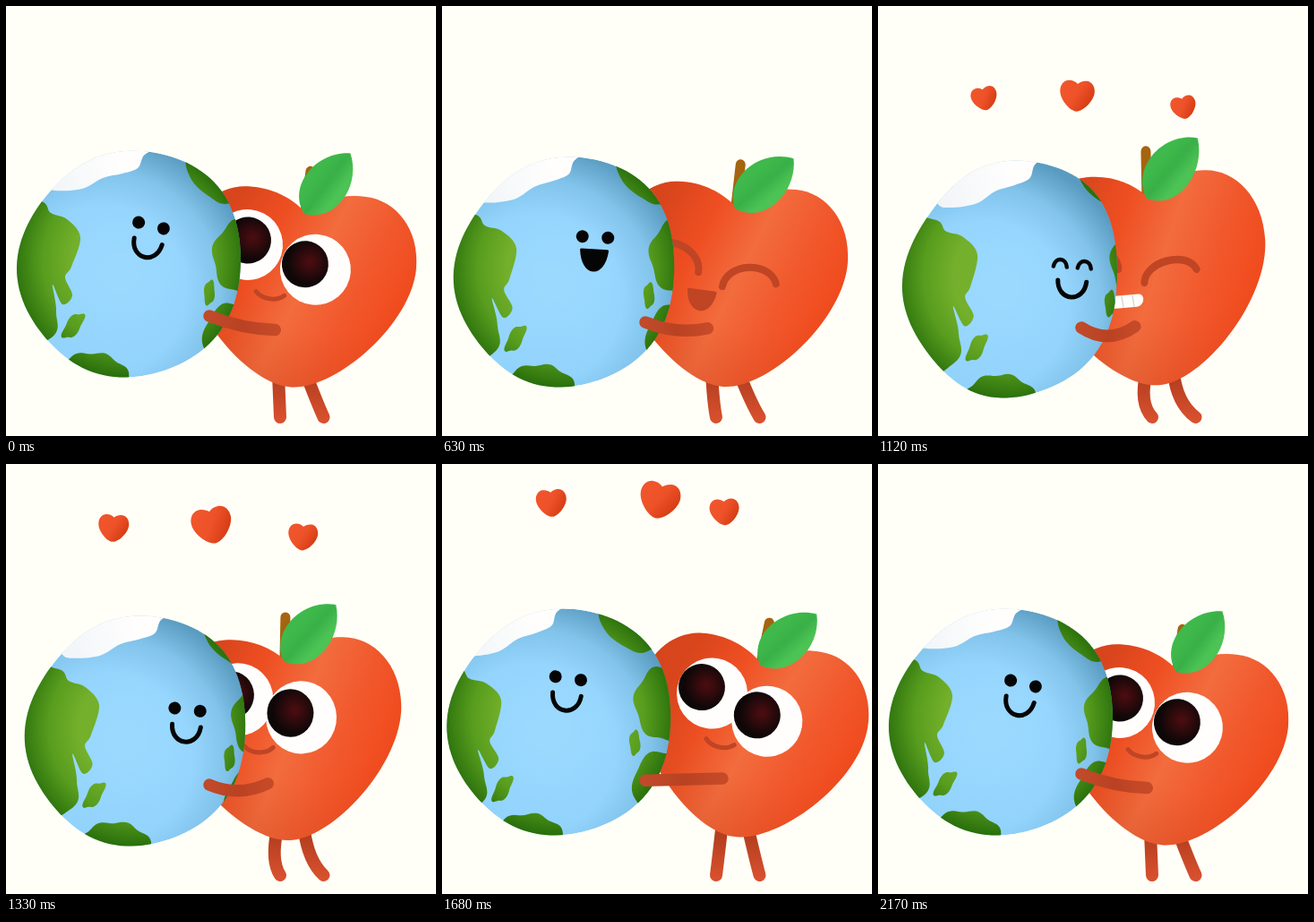
An HTML page with a canvas for the animation above (2.31 s loop, 480 by 480 pixels).

```html
<!DOCTYPE html>
<html lang="en">
<head>
<meta charset="utf-8">
<title>Earth hug</title>
<style>
html, body { margin: 0; width: 100%; height: 100%; overflow: hidden; background: #fffff7; }
canvas { display: block; width: 480px; height: 480px; }
</style>
</head>
<body>
<canvas id="stage" width="480" height="480"></canvas>
<script>
const ctx = document.getElementById('stage').getContext('2d');
const LOOP = 2310, STEP = 70;
const BROWN = '#bf4525', INK = '#050505';

// gx, gy: globe centre; turn, roll: its spin; fx, fy, nod: its face;
// ax, ay: dip of the heart; tilt, leaf: angles; gap: between the eyes; hand: height
const POSES = [
  { gx: 137, gy: 288, squeeze: 0, turn: 0, roll: 0, fx: 25, fy: -43, nod: .24, ax: 334, ay: 230, tilt: .088, leaf: -.92, gap: 78, hand: 346 },
  { gx: 130, gy: 288, squeeze: 0, turn: -8, roll: -.1, fx: 10, fy: -49, nod: .13, ax: 357, ay: 222, tilt: .163, leaf: -.72, gap: 65, hand: 354 },
  { gx: 136, gy: 297, squeeze: .35, turn: 3, roll: -.07, fx: 35, fy: -39, nod: .06, ax: 328, ay: 224, tilt: .07, leaf: -.69, gap: 72, hand: 353 },
  { gx: 147, gy: 305, squeeze: 1, turn: 20, roll: -.07, fx: 70, fy: -16, nod: .07, ax: 300, ay: 212, tilt: -.061, leaf: -.82, gap: 72, hand: 359 },
  { gx: 140, gy: 292, squeeze: 0, turn: 8, roll: 0, fx: 44, fy: -33, nod: .14, ax: 325, ay: 222, tilt: .026, leaf: -.81, gap: 68, hand: 357 }
];
// Time of each key and the pose reached there; fractions blend neighbours.
const KEY_T = [0, 350, 490, 560, 630, 1120, 1470, 1645, 1890, 2170];
const KEY_P = [0, 1, 1, 1.2, 2, 3, 4, 1, .2, 0];

// Monotone cubic through the given values.
function curve(ts, vs, t) {
  const last = ts.length - 1;
  if (t >= ts[last]) return vs[last];
  let i = 0;
  while (t >= ts[i + 1]) i++;
  const slope = k => (vs[k + 1] - vs[k]) / (ts[k + 1] - ts[k]);
  const tangent = k => {
    if (k === 0 || k === last) return 0;
    const a = slope(k - 1), b = slope(k);
    return a * b <= 0 ? 0 : 2 * a * b / (a + b);
  };
  const h = ts[i + 1] - ts[i], u = (t - ts[i]) / h, v = 1 - u;
  return v * v * (1 + 2 * u) * vs[i] + u * u * (3 - 2 * u) * vs[i + 1]
    + h * u * v * (v * tangent(i) - u * tangent(i + 1));
}

function poseAt(t) {
  const pose = {};
  for (const key in POSES[0]) {
    const vals = KEY_P.map(p => {
      const a = POSES[Math.floor(p)][key], b = POSES[Math.ceil(p)][key];
      return a + (b - a) * (p % 1);
    });
    pose[key] = curve(KEY_T, vals, t);
  }
  pose.stretch = 1 + .08 * pose.squeeze;
  return pose;
}

// Stage position of a point given in the heart's own frame.
function onHeart(p, x, y) {
  const c = Math.cos(p.tilt), s = Math.sin(p.tilt);
  y *= p.stretch;
  return [p.ax + c * x - s * y, p.ay + s * x + c * y];
}

// Closed smooth shape through a flat list of points.
function smooth(...flat) {
  const n = flat.length / 2, path = new Path2D();
  const at = i => [flat[2 * ((i + n) % n)], flat[2 * ((i + n) % n) + 1]];
  path.moveTo(...at(0));
  for (let i = 0; i < n; i++) {
    const [a, b, c, d] = [at(i - 1), at(i), at(i + 1), at(i + 2)];
    path.bezierCurveTo(b[0] + (c[0] - a[0]) / 6, b[1] + (c[1] - a[1]) / 6,
      c[0] - (d[0] - b[0]) / 6, c[1] - (d[1] - b[1]) / 6, c[0], c[1]);
  }
  return path;
}

// Ellipse with a wavy coast.
function blob(x, y, rx, ry, tilt, waves, depth) {
  const path = new Path2D(), c = Math.cos(tilt), s = Math.sin(tilt);
  for (let a = 0; a < 6.28; a += .06) {
    const k = 1 + depth * Math.sin(waves * a);
    const px = rx * k * Math.cos(a), py = ry * k * Math.sin(a);
    path.lineTo(x + c * px - s * py, y + s * px + c * py);
  }
  path.closePath();
  return path;
}

const LAND = [
  smooth(-30, 215, 36, 217, 50, 231, 68, 238, 83, 258, 73, 291, 66, 303, 74, 323, 63, 333,
    52, 311, 56, 341, 48, 372, -40, 400),
  smooth(203, 165, 206, 192, 226, 212, 250, 220, 290, 190, 240, 140),
  blob(75, 357, 8, 17, .65, 4, .12),
  blob(95, 425, 45, 38, 0, 9, .04),
  blob(264, 280, 33, 41, 0, 6, .06),
  blob(227, 320, 6, 14, .1, 4, .1),
  blob(247, 367, 26, 36, .3, 5, .05)
];
const ICE = smooth(30, 170, 42, 200, 55, 206, 85, 204, 108, 192, 130, 187, 147, 181, 153, 168, 165, 150, 90, 120);

const HEART = new Path2D();
for (const s of [1, -1]) {
  HEART.moveTo(0, 0);
  HEART.bezierCurveTo(s * 16, -14, s * 38, -24, s * 66, -23);
  HEART.bezierCurveTo(s * 100, -22, s * 129, 8, s * 129, 52);
  HEART.bezierCurveTo(s * 129, 115, s * 50, 196, 0, 196);
}

function stops(g, ...list) {
  list.forEach((c, i) => g.addColorStop(i / (list.length - 1), c));
  return g;
}
const linear = (x0, y0, x1, y1, ...c) => stops(ctx.createLinearGradient(x0, y0, x1, y1), ...c);
const radial = (x, y, r0, r1, ...c) => stops(ctx.createRadialGradient(x, y, r0, x, y, r1), ...c);

function fill(path, style) {
  ctx.fillStyle = style;
  ctx.fill(path);
}

function dot(x, y, r, style) {
  ctx.fillStyle = style;
  ctx.beginPath();
  ctx.arc(x, y, r, 0, 7);
  ctx.fill();
}

function line(style, width, draw) {
  ctx.strokeStyle = style;
  ctx.lineWidth = width;
  ctx.beginPath();
  draw();
  ctx.stroke();
}

function at(x, y, tilt, draw) {
  ctx.save();
  ctx.translate(x, y);
  ctx.rotate(tilt);
  draw();
  ctx.restore();
}

// Arch from -w to w whose middle lies dy away from the ends.
function arch(w, dy, k = .8) {
  ctx.moveTo(-w, 0);
  ctx.bezierCurveTo(-w * k, dy * 4 / 3, w * k, dy * 4 / 3, w, 0);
}

function openMouth(w, depth, style) {
  ctx.fillStyle = style;
  line(style, 3, () => { arch(w, depth); ctx.closePath(); });
  ctx.fill();
}

function drawLegs(p) {
  const [tip] = onHeart(p, 0, 195);
  const bend = Math.min(0, (p.tilt - .088) * 85);
  for (const [hip, foot] of [[tip - 13, 306], [tip + 17, 354.5]]) {
    line(linear(0, 416, 0, 462, '#b43f20', '#d8502e'), 14, () => {
      ctx.moveTo(hip, 408);
      ctx.quadraticCurveTo(hip + (foot - hip) * .65 + bend, 443, foot, 459);
    });
  }
}

function drawLeaf() {
  const len = 85;
  for (const [side, edge] of [[-1, '#3fb94b'], [1, '#4cc354']]) {
    ctx.fillStyle = linear(0, 0, 0, side * 16, '#39b047', edge);
    ctx.beginPath();
    ctx.moveTo(0, 0);
    ctx.bezierCurveTo(len * .15, side * 34, len * .75, side * 32, len, 0);
    ctx.fill();
  }
  line('#39ae46', 1, () => { ctx.moveTo(1, 0); ctx.lineTo(len - 2, 0); });
}

function drawEyes(p) {
  for (const [x, y, look] of [[17 - p.gap, 42, p.gap - 78], [17, 63, -12]]) {
    dot(x, y, 39.5, '#fffefd');
    dot(x + look, y - 5, 26, radial(x + look + 5, y - 8, 2, 25, '#490d10', '#2c0a0c', '#0e0708'));
  }
}

function drawLids(p) {
  const rise = 21 - 5 * p.squeeze;
  at(21 - p.gap - 14, 64, .33, () => line(BROWN, 8, () => arch(30, -rise)));
  at(21, 84, -.08 - .1 * p.squeeze, () => line(BROWN, 8, () => arch(30, -rise)));
}

function drawTeeth() {
  ctx.rotate(-.08);
  ctx.fillStyle = '#fffefa';
  ctx.beginPath();
  ctx.roundRect(-20, 7, 40, 13, [3, 5, 8, 6]);
  ctx.fill();
  for (const x of [-4, 8]) {
    line('#dcd8d2', 1.5, () => { ctx.moveTo(x, 8); ctx.lineTo(x + 1, 19); });
  }
}

function drawApple(p, mood) {
  at(p.ax, p.ay, p.tilt, () => {
    ctx.scale(1, p.stretch);
    line('#a5640f', 11, () => { ctx.moveTo(0, -2); ctx.lineTo(2, -46); });
    fill(HEART, linear(-85, 10, 120, 100, '#dc451c', '#ee4f22', '#f26c3e', '#f1582c', '#f24a1c'));
    fill(HEART, radial(25, 50, 85, 185, 'rgba(190,70,30,0)', 'rgba(190,70,30,.35)'));
    at(-1, 2, p.leaf - p.tilt * 0 - p.tilt, drawLeaf);

    if (mood.shut) drawLids(p);
    else drawEyes(p);
    at(-31, 94, .06, () => {
      if (mood.open) openMouth(15, 20, BROWN);
      else if (mood.bliss) drawTeeth();
      else line(BROWN, 5, () => arch(16, 6, .5));
    });
  });
}

function drawGlobe(p) {
  const rx = 125 - 5 * p.squeeze, ry = 126.5 + 6 * p.squeeze, lean = .04 + .02 * p.squeeze;
  const outline = new Path2D();
  for (let a = 0; a < 6.28; a += .05) {
    const k = 1 + lean * Math.sin(2 * a) ** 2 * Math.cos(a);
    outline.lineTo(rx * k * Math.cos(a), ry * k * Math.sin(a - lean));
  }
  at(p.gx, p.gy, 0, () => {
    ctx.clip(outline);
    fill(outline, radial(-10, 10, 20, 140, '#9bd9ff', '#8fd1fb'));
    fill(outline, radial(-30, 30, 95, 172, 'rgba(15,80,110,0)', 'rgba(15,80,110,.12)', 'rgba(15,80,110,.42)'));

    ctx.translate(p.turn, 0);
    ctx.rotate(p.roll);
    ctx.scale(1, ry / 126.5);
    ctx.translate(-137, -288);
    const x = 137 - p.turn;
    const green = radial(x, 284, 62, 130, '#74b02b', '#589d1e', '#2a700c');
    for (const shape of LAND) fill(shape, green);
    fill(ICE, linear(45, 200, 130, 175, '#f1f5f8', '#fffefd'));
  });
}

function drawGlobeFace(p, mood) {
  at(p.gx + p.fx, p.gy + p.fy, p.nod, () => {
    for (const s of [-1, 1]) {
      if (mood.bliss) at(s * 13.5, 3, 0, () => line(INK, 4.5, () => arch(7.5, -8)));
      else dot(s * 14.3, 0, 7, INK);
    }
    if (mood.open) {
      ctx.translate(0, 15);
      openMouth(14.5, 22, INK);
    } else {
      ctx.translate(1, 18);
      line(INK, 5, () => arch(16, 18, .92));
    }
  });
}

function drawArm(p) {
  const [x, y] = onHeart(p, -22, 134);
  const sag = Math.max(0, 80 - (x - 227));
  line(linear(227, 0, x, 0, '#c04a29', '#b94223', '#c64a28'), 13.5, () => {
    ctx.moveTo(227, p.hand);
    ctx.quadraticCurveTo((227 + x) / 2, (p.hand + y) / 2 + sag, x, y);
  });
}

function drawHearts(t) {
  const u = (t - 840) / 980;
  if (u <= 0 || u >= 1) return;
  const rise = 158 - 122 * (1 - (1 - u) ** 2);
  const grow = Math.min(1, u * 3, (1 - u) * 7);
  for (const [x, drift, drop, size, phase] of [[117, 6, 5, 34, 2.1], [212, 36, 2, 45, .3], [354, -45, 15, 33, 2.1]]) {
    at(x + drift * u, rise + drop, .2 * Math.sin(9 * u + phase), () => {
      const k = size * grow / 258;
      ctx.scale(k, k * 1.05);
      ctx.translate(0, -85);
      fill(HEART, linear(-100, 0, 100, 130, '#f0552b', '#ee5229', '#d63d15'));
    });
  }
}

function draw(t) {
  const p = poseAt(t);
  const mood = {
    open: t >= 210 && t < 840,
    bliss: t >= 840 && t < 1330,
    shut: t >= 560 && t < 1330
  };
  ctx.fillStyle = '#fffff7';
  ctx.fillRect(0, 0, 480, 480);
  ctx.lineCap = ctx.lineJoin = 'round';
  drawLegs(p);
  drawApple(p, mood);
  drawGlobe(p);
  drawGlobeFace(p, mood);
  drawArm(p);
  drawHearts(t);
}

const start = performance.now();
function tick() {
  const t = (performance.now() - start) % LOOP;
  draw(Math.floor(t / STEP) * STEP);
  requestAnimationFrame(tick);
}
tick();
</script>
</body>
</html>
```
